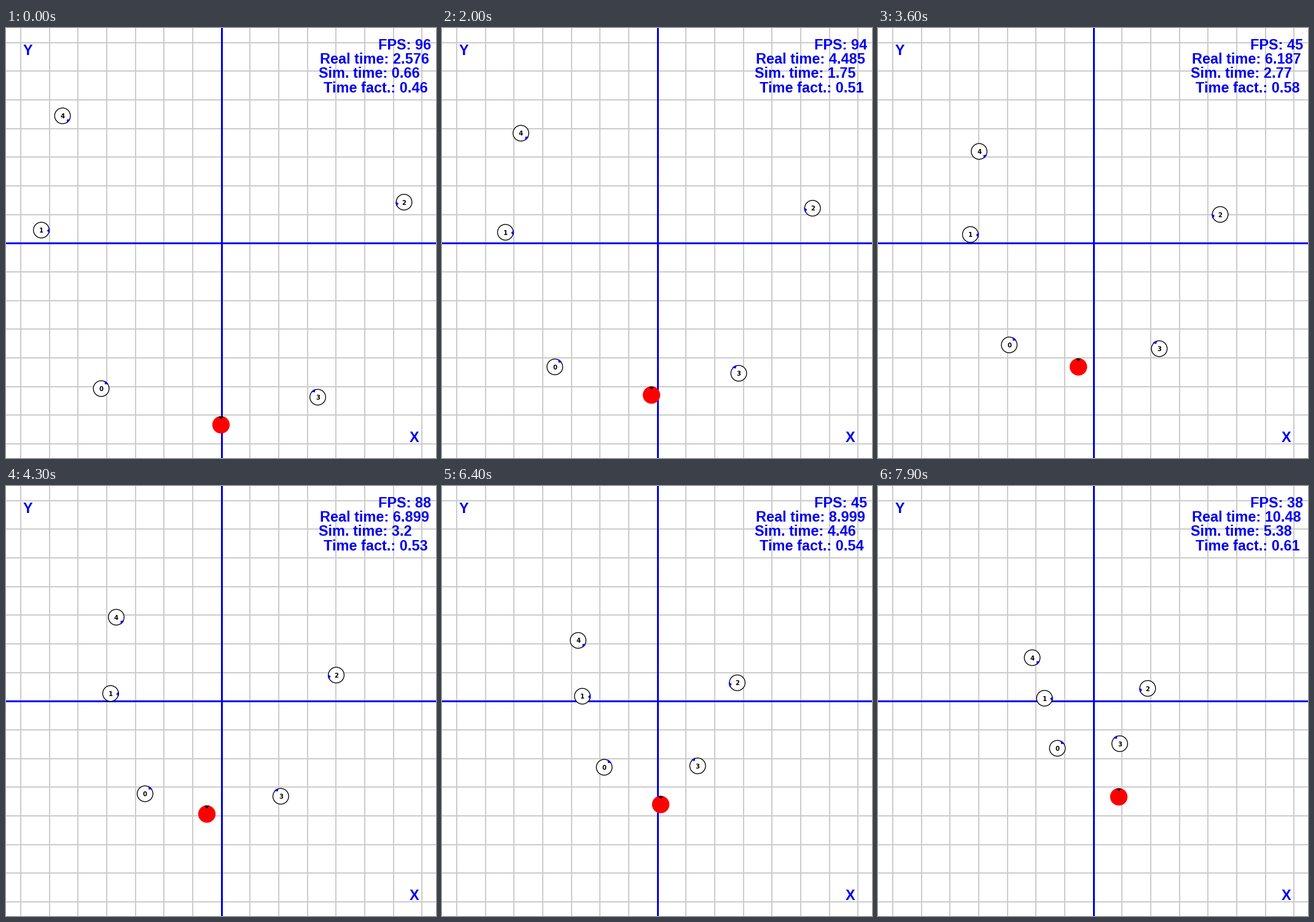
Recreate the animation shown at these times as a matplotlib script. Size 700 px wide and 700 px high, loop 8 s.

```python
import math
import random

import numpy as np
import matplotlib.pyplot as plt
from matplotlib.animation import FuncAnimation
from matplotlib.patches import Circle, Polygon, Rectangle

SIZE, FRAMES, STEP = 700, 80, 100
BLUE, GREY = "#0000f0", "#cccccc"
STALLED = {11, 32, 37, 54}

# Key poses: step, real time, simulated time, red robot's x and y
KEYS = np.array([
    (0, 2.576, 0.66, 350, 646),
    (20, 4.485, 1.75, 341, 597.5),
    (29, 5.475, 2.34, 331, 571.5),
    (43, 6.899, 3.2, 327, 534),
    (52, 7.78, 3.68, 338.5, 520.5),
    (64, 8.999, 4.46, 356, 518.5),
    (79, 10.48, 5.38, 392, 506),
])
STEPS, REAL, SIM, RED_X, RED_Y = KEYS.T

# Start, end and sideways bend of each numbered robot
ROUTES = [
    ((155, 587), (292, 427), (-1, -1.5)),
    ((57.5, 329), (271, 345.5), (0, 0)),
    ((648, 283.5), (439, 329.5), (0, 0)),
    ((507.5, 601), (393.5, 419.5), (0, 0)),
    ((92, 143), (251, 279.5), (3.5, -1.5)),
]
LAG = 0.1  # start-up time constant of the motors

rng = random.Random(4)
FPS = [round(100 - 67 * rng.random() ** 2) for _ in range(FRAMES)]
FACTOR = [round(rng.uniform(0.46, 0.62), 2) for _ in range(FRAMES)]

fig = plt.figure(figsize=(7, 7), dpi=100, facecolor="white")
ax = fig.add_axes([0, 0, 1, 1])
ax.set_xlim(0, SIZE)
ax.set_ylim(SIZE, 0)
ax.axis("off")


def bar(x, y, w, h, color):
    ax.add_patch(Rectangle((x, y), w, h, fc=color, lw=0, aa=False))


def label(x, y, s="", px=23.5, font="Liberation Sans", color=BLUE, **kw):
    return ax.text(x, y, s, fontsize=px * 0.72, family=font, weight="bold",
                   color=color, zorder=9, **kw)


def smooth(t, ts, vs):
    """Cubic Hermite curve through the points (ts, vs)."""
    m = np.gradient(vs, ts)
    k = min(max(int(np.searchsorted(ts, t)) - 1, 0), len(ts) - 2)
    h = ts[k + 1] - ts[k]
    u = (t - ts[k]) / h
    return ((1 + 2 * u) * (1 - u) ** 2 * vs[k] + u * (1 - u) ** 2 * h * m[k]
            + u * u * (3 - 2 * u) * vs[k + 1] + u * u * (u - 1) * h * m[k + 1])


def travelled(sim):
    """Distance covered at unit speed after a short run-up."""
    s = sim - SIM[0]
    return s - LAG * (1 - math.exp(-s / LAG))


class Robot:
    def __init__(self, radius, face, edge, mark, heading, tag=""):
        self.body = Circle((0, 0), radius, fc=face, ec=edge, lw=0.95, zorder=4)
        self.mark = Polygon([(0, 0)] * 3, fc=mark, lw=0, zorder=5)
        ax.add_patch(self.body)
        ax.add_patch(self.mark)
        self.tag = label(0, 0, tag, 10, "DejaVu Sans", "black",
                         ha="center", va="center_baseline")
        # Heading mark: an arc on the rim with a tip pointing inwards
        arc = heading + np.linspace(-0.3, 0.3, 7)
        r = np.append(np.full(7, 13.8), 9.2)
        a = np.append(arc, heading)
        self.wedge = np.column_stack([r * np.cos(a), r * np.sin(a)])

    def move(self, x, y):
        self.body.center = (x, y)
        self.mark.set_xy(self.wedge + (x, y))
        self.tag.set_position((x, y))


# Grid and axes
offsets = [350 + k * 140 / 3 for k in range(-7, 8) if k]
for p in offsets:
    bar(math.floor(p), 0, 2, SIZE, GREY)
for p in offsets:
    bar(0, math.ceil(p) - 1, SIZE, 2, GREY)
bar(350, 0, 3, SIZE, BLUE)
bar(0, 349, SIZE, 3, BLUE)
label(28, 44, "Y")
label(657, 674, "X")

readout = [label(x, y) for x, y in
           ((606, 35), (511, 58), (509, 81), (517, 105))]

robots = []
for n, route in enumerate(ROUTES):
    start, end, bend = np.array(route)
    dx, dy = end - start
    robot = Robot(12.8, "white", "black", BLUE, math.atan2(dy, dx), str(n))
    robots.append((robot, start, end, bend))
red = Robot(13.5, "red", "red", "black", -math.pi / 2)


def draw(i):
    i -= i in STALLED
    real = float(np.interp(i, STEPS, REAL))
    sim = float(np.interp(i, STEPS, SIM))
    lines = (f"FPS: {FPS[i]}", f"Real time: {round(real, 3)}",
             f"Sim. time: {round(sim, 2)}", f"Time fact.: {FACTOR[i]}")
    for text, line in zip(readout, lines):
        text.set_text(line)

    p = travelled(sim) / travelled(SIM[-1])
    for robot, start, end, bend in robots:
        robot.move(*(start + (end - start) * p + bend * 4 * p * (1 - p)))
    red.move(smooth(sim, SIM, RED_X), smooth(sim, SIM, RED_Y))
    return []


anim = FuncAnimation(fig, draw, frames=FRAMES, interval=STEP, repeat=True,
                     repeat_delay=0, init_func=lambda: draw(0))
plt.show()
```
